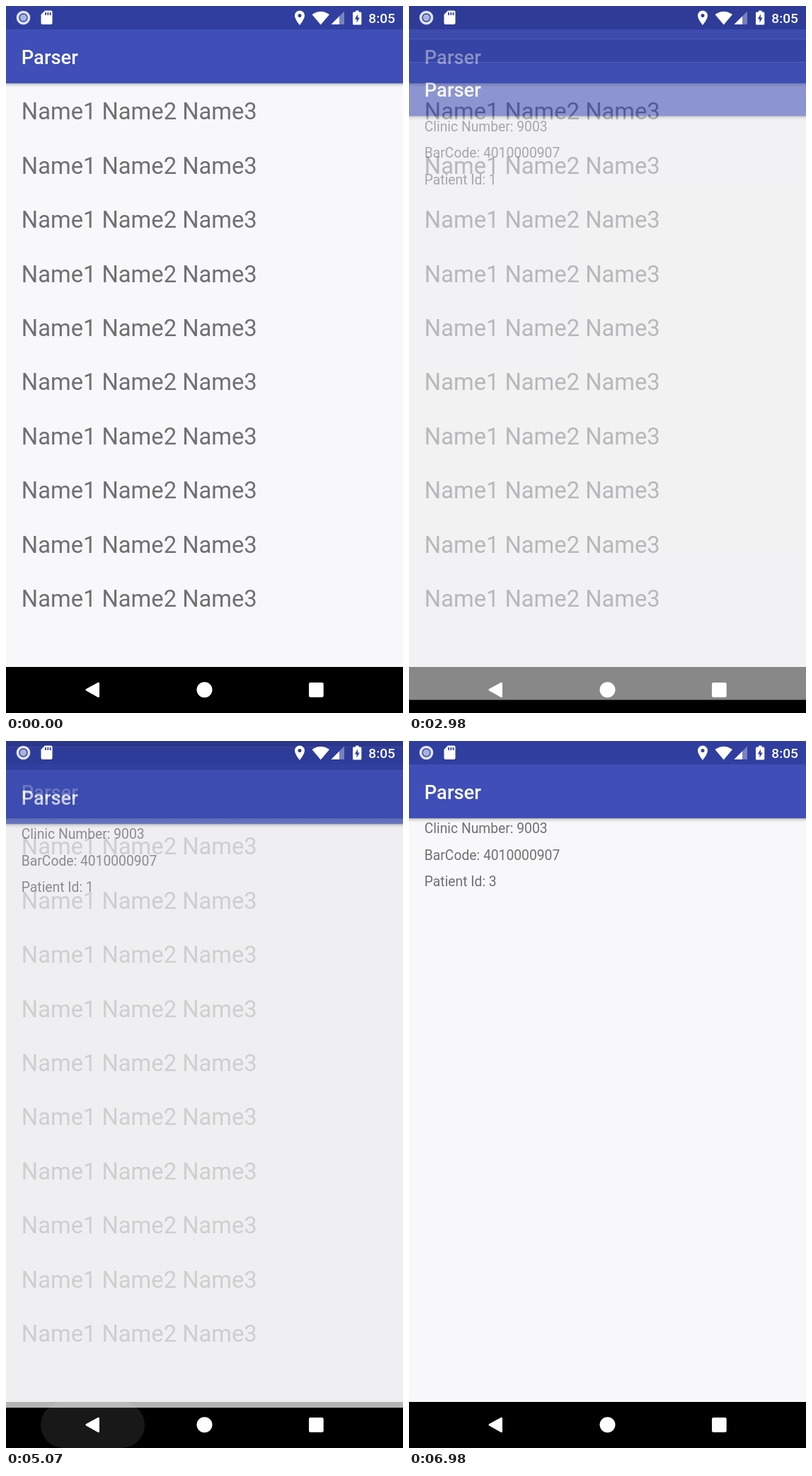
Animation of 561 by 998 pixels, one loop 8000 ms. Source, as an HTML page:

```html
<!DOCTYPE html>
<html lang="en">
<head>
<meta charset="utf-8">
<title>Parser</title>
<style>
  html, body { margin: 0; width: 100%; height: 100%; overflow: hidden; background: #000; }
  svg { display: block; width: 561px; height: 998px; }
  text { font-family: Roboto, "Noto Sans", sans-serif; fill: #707072; }
  .title { font-size: 27.3px; font-weight: 500; fill: #fff; }
  .name { font-size: 32.73px; }
  .detail { font-size: 19.3px; }
  .clock { font-size: 19.1px; font-weight: 500; fill: #fff; }
</style>
</head>
<body>
<svg viewBox="0 0 561 998">
  <defs>
    <linearGradient id="shade" x2="0" y2="1">
      <stop offset="0" stop-color="#000" stop-opacity=".3"/>
      <stop offset=".4" stop-color="#000" stop-opacity=".1"/>
      <stop offset="1" stop-color="#000" stop-opacity="0"/>
    </linearGradient>
    <g id="chrome">
      <rect width="561" height="998" fill="#f8f8fa"/>
      <rect width="561" height="33" fill="#303f9f"/>
      <rect y="33" width="561" height="76" fill="#3f4fb7"/>
      <rect y="109" width="561" height="6" fill="url(#shade)"/>
      <rect y="933" width="561" height="65"/>
      <text class="title" x="21.8" y="81.7">Parser</text>
    </g>
  </defs>

  <g id="list"><use href="#chrome"/></g>
  <rect id="dim" width="561" height="998"/>
  <g id="details">
    <use href="#chrome"/>
    <text class="detail" x="21.8" y="130.2">Clinic Number: 9003</text>
    <text class="detail" x="21.8" y="167.7">BarCode: 4010000907</text>
    <text class="detail" x="21.8" y="205.2" id="patient"></text>
  </g>

  <rect id="ripple" y="933" height="65" rx="32.5" fill="#fff"/>

  <g fill="#fff">
    <circle cx="24.5" cy="16.5" r="8" fill="none" stroke="#dfe3f4" stroke-width="3.6"/>
    <circle cx="24.5" cy="16.5" r="4.8" fill="#a9b3dd"/>
    <path d="M55 6.5H63.5Q65.5 6.5 65.5 8.5V24Q65.5 26 63.5 26H51.5Q49.5 26 49.5 24V12Z"/>
    <path d="M56 9v4M59.3 9v4M62.6 9v4" stroke="#303f9f" stroke-width="1.8"/>
    <path fill-rule="evenodd" d="M415 6.5A7 7 0 0 1 422 13.5C422 18.5 415 27 415 27S408 18.5 408 13.5A7 7 0 0 1 415 6.5ZM415 11A2.5 2.5 0 0 0 415 16A2.5 2.5 0 0 0 415 11Z"/>
    <path d="M432.5 12Q444.700 3.500 457 12L444.700 26.500Z"/>
    <path d="M478 7.500V26H459.500Z" opacity=".35"/>
    <path d="M471 14.500V26H459.500Z"/>
    <path d="M494 6.500H498.500V8.500H501Q502.300 8.500 502.300 10V25Q502.300 26.500 501 26.500H491.300Q490 26.500 490 25V10Q490 8.500 491.300 8.500H494Z"/>
    <path d="M497 11.500L492.800 18.500H495.500V23.500L499.700 16.500H497Z" fill="#303f9f"/>
    <text class="clock" x="512.3" y="23.800">8:05</text>
    <path d="M114 965.300L130.500 956.200V974.500Z" stroke="#fff" stroke-width="3" stroke-linejoin="round"/>
    <circle cx="280.500" cy="965.300" r="11"/>
    <rect x="428" y="955" width="20.700" height="20.700" rx="2"/>
  </g>
</svg>
<script>
  const LOOP = 8000;
  const SLIDE = 80;
  const CLOSE_AT = 4930;
  const OPENINGS = [
    { start: 2945, shown: 2980, until: CLOSE_AT, patient: 1 },
    { start: 6618, shown: 6670, until: LOOP, patient: 3 }
  ];
  const $ = id => document.getElementById(id);
  const list = $('list'), dim = $('dim'), details = $('details');
  const patient = $('patient'), ripple = $('ripple');

  for (let i = 0; i < 10; i++) {
    list.insertAdjacentHTML('beforeend',
      `<text class="name" x="21.8" y="${160.4 + i * 76.4}">Name1 Name2 Name3</text>`);
  }

  const clamp = v => Math.min(1, Math.max(0, v));
  const progress = (t, start, length) => clamp((t - start) / length);
  const easeOut = (p, power) => 1 - (1 - p) ** power;

  // Opening rises and fades in; closing drops and fades out.
  function windowState(t) {
    const opening = OPENINGS.find(o => t >= o.shown && t < o.until);
    if (opening) {
      const { start } = opening;
      return {
        alpha: easeOut(progress(t, start, 200), 4),
        y: SLIDE * (1 - easeOut(progress(t, start, 350), 5)),
        shade: 0.3 * progress(t, start, 217),
        id: opening.patient
      };
    }
    if (t >= CLOSE_AT && t < CLOSE_AT + 250) {
      const p = progress(t, CLOSE_AT, 250);
      return {
        alpha: 1 - progress(t, CLOSE_AT + 100, 150),
        y: SLIDE * p ** 4,
        shade: 0.3 * (1 - p),
        id: 1
      };
    }
    return { alpha: 0, y: 0, shade: 0, id: 1 };
  }

  function drawRipple(t) {
    const grow = 1 - 400 ** (-1.4 * progress(t, 4780, 350));
    const fade = 1 - progress(t, CLOSE_AT, 450);
    const width = 147 * grow;
    ripple.setAttribute('x', 122.5 - width / 2);
    ripple.setAttribute('width', width);
    ripple.setAttribute('opacity', t >= 4800 ? 0.135 * fade : 0);
  }

  function draw(t) {
    const { alpha, y, shade, id } = windowState(t);
    details.setAttribute('opacity', alpha);
    details.setAttribute('transform', `translate(0 ${y})`);
    dim.setAttribute('opacity', shade);
    patient.textContent = `Patient Id: ${id}`;
    drawRipple(t);
  }

  const began = performance.now();
  function tick() {
    draw((performance.now() - began) % LOOP);
    requestAnimationFrame(tick);
  }
  tick();
</script>
</body>
</html>
```
